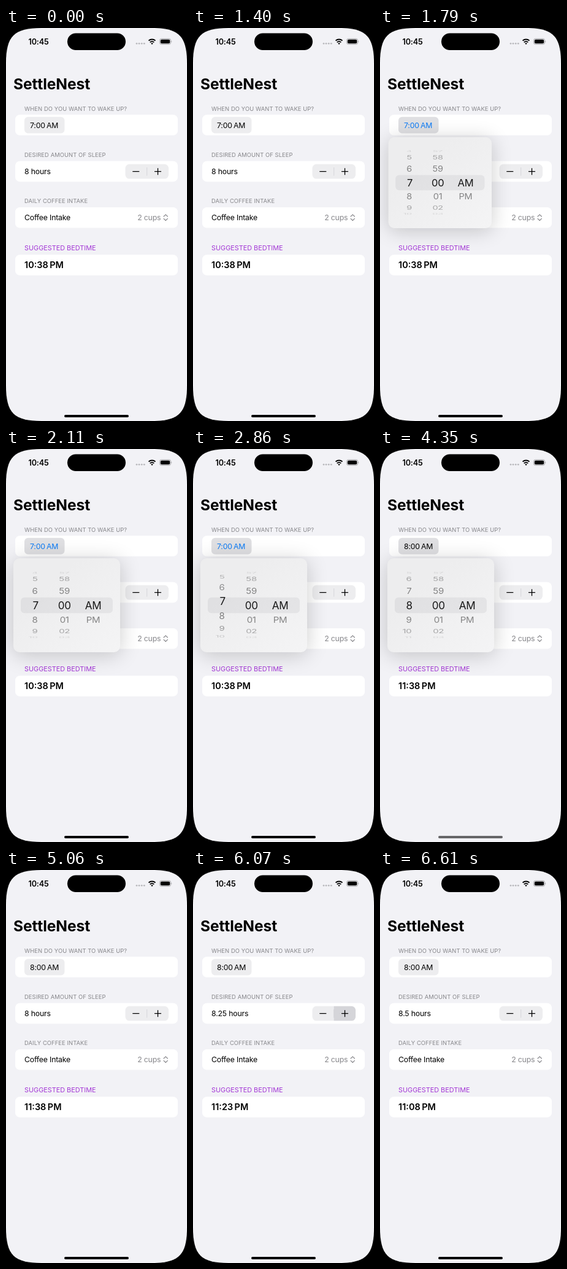
Recreate the animation shown at these times as an HTML page. Size 295 by 640 pixels, loop 8000 ms.

```html
<!DOCTYPE html>
<html lang="en">
<head>
<meta charset="utf-8">
<title>Bedtime planner</title>
<style>
  html, body { margin: 0; width: 100%; height: 100%; overflow: hidden; background: #000; }
  svg { display: block; width: 295px; height: 640px; }
  text { font-family: Inter, "Liberation Sans", sans-serif; font-size: 12.3px; letter-spacing: -0.016em; white-space: pre; }
  .head { font-size: 9.4px; letter-spacing: .08px; fill: #87878b; }
  .bed { font-size: 14.5px; font-weight: 600; letter-spacing: 0; }
</style>
</head>
<body>
<svg viewBox="0 0 295 640" xmlns="http://www.w3.org/2000/svg">
  <defs>
    <filter id="blur" x="-50%" y="-50%" width="200%" height="200%"><feGaussianBlur stdDeviation="17"/></filter>
    <linearGradient id="panel" x1="0" y1="0" x2="1" y2="1">
      <stop offset=".3" stop-color="#ededee"/><stop offset="1" stop-color="#f4f4f5"/>
    </linearGradient>
    <clipPath id="screen"><path id="outline" d="M0 58C0 13 13 0 58 0H237C282 0 295 13 295 58V582C295 627 282 640 237 640H58C13 640 0 627 0 582Z"/></clipPath>
  </defs>
  <rect width="295" height="640"/>
  <g clip-path="url(#screen)">
    <rect width="295" height="640" fill="#f2f2f6"/>

    <text x="36.5" y="26.5" font-weight="600" style="font-size:12.7px">10:45</text>
    <rect x="100" y="8.5" width="95" height="27.5" rx="13.75"/>
    <g fill="#b9b9bd">
      <circle cx="213" cy="25.3" r="1.4"/><circle cx="217" cy="25.3" r="1.4"/>
      <circle cx="221.2" cy="25.3" r="1.4"/><circle cx="225.3" cy="25.3" r="1.4"/>
    </g>
    <g fill="none" stroke="#000" stroke-width="1.8">
      <path d="M232.5 20.7A8 8 0 0 1 243.5 20.7"/>
      <path d="M234.7 23.3A4.8 4.8 0 0 1 241.3 23.3"/>
    </g>
    <path d="M238 27L236.2 25.1A2.6 2.6 0 0 1 239.8 25.1Z"/>
    <rect x="250.4" y="17.4" width="18.2" height="9.2" rx="3" fill="none" stroke="#000" stroke-opacity=".38" stroke-width=".8"/>
    <rect x="251.8" y="18.8" width="15.4" height="6.4" rx="1.9"/>
    <path d="M269.6 20.5Q271 22 269.6 23.5Z" opacity=".45"/>

    <text x="12" y="100.3" font-weight="700" style="font-size:24.6px;letter-spacing:-.1px">SettleNest</text>

    <g fill="#fff">
      <rect x="15" y="141.3" width="265" height="33.4" rx="7.5"/>
      <rect x="15" y="216.8" width="265" height="33.4" rx="7.5"/>
      <rect x="15" y="292" width="265" height="33.4" rx="7.5"/>
      <rect x="15" y="369.2" width="265" height="33.6" rx="7.5"/>
    </g>

    <text class="head" x="30" y="134.5">WHEN DO YOU WANT TO WAKE UP?</text>
    <rect id="pill" x="30" y="144.8" width="65.5" height="26.6" rx="6" fill="#767680"/>
    <text id="wake" x="39" y="162.7"><tspan></tspan><tspan dx="2.2"></tspan></text>

    <text class="head" x="30" y="209.7">DESIRED AMOUNT OF SLEEP</text>
    <text id="sleep" x="30" y="238"></text>
    <rect x="194.5" y="221.8" width="70.5" height="23.8" rx="6.5" fill="#767680" fill-opacity=".13"/>
    <path id="press" d="M229.7 221.8H258.5A6.5 6.5 0 0 1 265 228.3V239.1A6.5 6.5 0 0 1 258.5 245.6H229.7Z" fill="#767680" fill-opacity=".2"/>
    <path d="M229.7 227V240.5" stroke="#cfcfd3" stroke-width=".8"/>
    <path d="M206.3 233.7H217.3M242 233.7H253M247.5 228.2V239.2" stroke="#000" stroke-width="1.3"/>

    <text class="head" x="30" y="285">DAILY COFFEE INTAKE</text>
    <text x="30" y="313.2">Coffee Intake</text>
    <text x="252.3" y="313.2" text-anchor="end" fill="#87878b">2 cups</text>
    <path d="M257 307L260.2 303.8L263.4 307M257 310.3L260.2 313.5L263.4 310.3" fill="none" stroke="#87878b" stroke-width="1.15" stroke-linecap="round" stroke-linejoin="round"/>

    <text x="30" y="362" fill="#a337d6" style="font-size:10.86px;letter-spacing:0">SUGGESTED BEDTIME</text>
    <text id="bed" class="bed" x="30" y="391.4"><tspan></tspan><tspan dx="2.4"></tspan></text>

    <g id="popup">
      <rect x="12" y="182" width="174" height="153" rx="10" opacity=".2" filter="url(#blur)"/>
      <rect x="12" y="178" width="174" height="153" rx="10" fill="url(#panel)"/>
      <rect x="24" y="241.8" width="150" height="25.4" rx="6" fill="#767680" fill-opacity=".11"/>
      <g id="wheels"></g>
    </g>
    <rect id="home" x="95" y="630" width="105" height="4" rx="2"/>
  </g>
</svg>
<script>
const LOOP = 8000;
const $ = id => document.getElementById(id);
const clamp = v => Math.max(0, Math.min(1, v));
const easeOut = v => 1 - (1 - clamp(v)) ** 3;
const mod = (n, m) => ((n % m) + m) % m;

// Moving stretches as [start, end, steps]; the picture rests between them.
const STRETCHES = [[1400, 2110, 10], [2410, 3180, 11], [3250, 3570, 5], [4350, 4620, 4]];
const DRAG = [[2410, 7], [2600, 7.1], [2900, 7.38], [3180, 7.64], [3410, 7.83], [3570, 8]];

function snap(t) {
  let held = t;
  for (const [start, end, steps] of STRETCHES) {
    if (t < start) break;
    const gap = (end - start) / (steps - 1);
    held = t >= end ? end : start + Math.floor((t - start) / gap + 1e-6) * gap;
  }
  return held;
}

function track(points, t) {
  if (t <= points[0][0]) return points[0][1];
  for (let i = 1; i < points.length; i++) {
    const [t0, v0] = points[i - 1], [t1, v1] = points[i];
    if (t <= t1) return v0 + (v1 - v0) * (t - t0) / (t1 - t0);
  }
  return points[points.length - 1][1];
}

function makeWheel(x, anchor, label) {
  const rows = [-3, -2, -1, 0, 1, 2, 3].map(offset => {
    const node = document.createElementNS("http://www.w3.org/2000/svg", "text");
    node.setAttribute("text-anchor", anchor);
    $("wheels").append(node);
    return { offset, node };
  });
  return position => rows.forEach(({ offset, node }) => {
    const value = Math.round(position) + offset;
    const distance = value - position;
    const angle = distance * 0.452;
    const squash = Math.max(0, Math.cos(angle));
    const chosen = Math.abs(distance) < 0.5;
    const size = chosen ? 17.1 : 15;
    const edge = anchor === "end" && !chosen ? x - 1.2 : x;
    node.textContent = label(value);
    node.style.fontSize = size + "px";
    node.setAttribute("y", size * 0.364);
    node.setAttribute("opacity", chosen ? 0.9 : squash * 0.5);
    node.setAttribute("transform",
      `translate(${edge} ${254.5 + 54 * Math.sin(angle)}) scale(1 ${squash})`);
  });
}

const hours = makeWheel(52.8, "end", n => mod(n - 1, 12) + 1);
const minutes = makeWheel(95.2, "middle", n => String(mod(n, 60)).padStart(2, "0"));
const halves = makeWheel(142, "middle", n => ["AM", "PM"][n] || "");
minutes(0);
halves(0);

function setClock(id, time, half) {
  const [a, b] = $(id).children;
  a.textContent = time;
  b.textContent = half;
}

function draw(t) {
  const s = snap(t);
  const closing = s >= 4350;
  const shrink = clamp((s - 4370) / 250);
  const open = closing ? 1 - shrink : easeOut((s - 1400) / 480);
  const scale = closing ? 1 - 0.75 * shrink ** 1.5 : 0.2 + 0.8 * open;
  const fade = closing ? (1 - shrink) ** 1.3 : clamp(open * 1.2);
  const shown = closing && s < 4400 ? 1 : fade;
  const size = shown === 1 && closing ? 1 : scale;

  $("popup").setAttribute("opacity", shown);
  $("popup").setAttribute("transform", `translate(63 172) scale(${size}) translate(-63 -172)`);
  $("pill").setAttribute("fill-opacity", 0.13 + 0.1 * shown);
  $("wake").setAttribute("fill", s >= 1470 && !closing ? "#0a7af5" : "#000");
  hours(track(DRAG, s));

  const woken = t >= 3740;
  const presses = (t >= 5990) + (t >= 6420);
  setClock("wake", woken ? "8:00" : "7:00", "AM");
  setClock("bed", woken ? ["11:38", "11:23", "11:08"][presses] : "10:38", "PM");
  $("sleep").textContent = 8 + presses * 0.25 + " hours";
  const pressed = (t >= 5990 && t < 6140) || (t >= 6420 && t < 6610);
  $("press").setAttribute("opacity", pressed ? 1 : 0);
  $("home").setAttribute("fill", t >= 4350 && t < 5060 ? "#666668" : "#000");
}

const begun = performance.now();
function tick() {
  draw((performance.now() - begun) % LOOP);
  requestAnimationFrame(tick);
}
tick();
</script>
</body>
</html>
```
